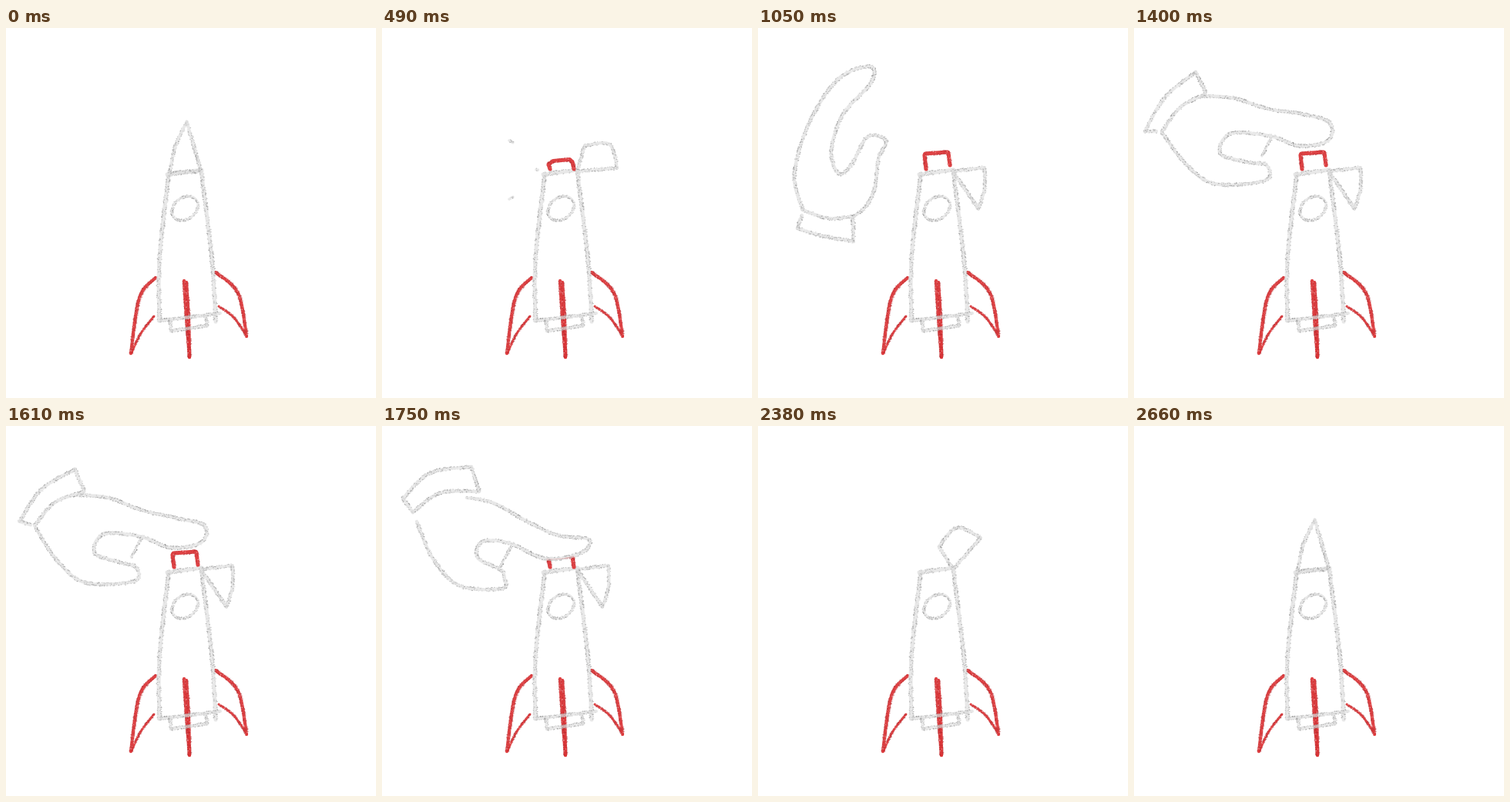
An HTML page with a canvas that plays this animation: 480 px wide and 480 px high, repeating every 2800 ms.

```html
<!DOCTYPE html>
<html lang="en">
<head>
<meta charset="utf-8">
<title>Rocket button</title>
<style>
html, body { margin: 0; height: 100%; overflow: hidden; background: #fff; }
canvas { display: block; width: 100vmin; height: 100vmin; }
</style>
</head>
<body>
<canvas id="stage" width="480" height="480"></canvas>
<script>
const ctx = document.getElementById('stage').getContext('2d');
const LOOP = 2800, STEP = 70;
const GRAY = { base: 'rgba(222,222,222,.7)', grain: [100, 100, 100], depth: 95 };
const RED = { base: 'rgba(220,52,54,.93)', grain: [150, 25, 30], depth: 50 };

const parse = text => text.split('|').map(s => s.trim().split(/\s+/).map(p => p.split(',').map(Number)));
const lerp = (a, b, k) => a + (b - a) * k;
const mix = (p, q, k) => [lerp(p[0], q[0], k), lerp(p[1], q[1], k)];

const ramp = (t, from, to) => Math.min(1, Math.max(0, (t - from) / (to - from)));
const ease = (t, from, to) => { const u = ramp(t, from, to); return u * u * (3 - 2 * u); };
const hump = (t, from, to) => Math.sin(Math.PI * ramp(t, from, to));

let seed;
function rnd() {
  seed = (Math.imul(seed, 1664525) + 1013904223) >>> 0;
  return seed / 4294967296;
}

// Catmull-Rom through the points
function smooth(pts) {
  const out = [pts[0]];
  for (let i = 0; i < pts.length - 1; i++) {
    const b = pts[i], c = pts[i + 1], a = pts[i - 1] || b, d = pts[i + 2] || c;
    for (let u = 0.125; u <= 1; u += 0.125)
      out.push([0, 1].map(j => b[j] + u / 2 * (c[j] - a[j] +
        u * (2 * a[j] - 5 * b[j] + 4 * c[j] - d[j] + u * (3 * (b[j] - c[j]) + d[j] - a[j])))));
  }
  return out;
}

function trace(pts) {
  ctx.beginPath();
  pts.forEach(p => ctx.lineTo(...p));
}

// A crayon line: pale core with patchy grain, densest near its edges
function ink(pts, width, tone) {
  trace(pts);
  ctx.strokeStyle = tone.base;
  ctx.lineWidth = width - 0.5;
  ctx.lineCap = ctx.lineJoin = 'round';
  ctx.stroke();
  let patch = 0.6;
  for (let i = 1; i < pts.length; i++) {
    const [x, y] = pts[i - 1], dx = pts[i][0] - x, dy = pts[i][1] - y;
    const len = Math.hypot(dx, dy);
    for (let n = 0; n < len * 2.6; n++) {
      if (rnd() < 0.06) patch = 0.3 + rnd() * 0.7;
      if (rnd() > patch) continue;
      const u = n / len / 2.6, off = (rnd() < 0.5 ? -1 : 1) * Math.sqrt(rnd()) * width * 0.54;
      const shade = rnd() * tone.depth;
      const rgb = rnd() < 0.2 ? [255, 255, 255] : tone.grain.map(c => c + shade);
      ctx.fillStyle = `rgba(${rgb},${0.3 + rnd() * 0.35})`;
      ctx.fillRect(x + dx * u - dy / len * off - 0.5, y + dy * u + dx / len * off - 0.5, 1 + rnd() * 0.6, 1);
    }
  }
}

const outerFins = parse('194,324 173,350 162,422 | 272,317 301,344 312,400 | 231,328 234,375 238,427 | 234,330 237,380 238,427');
const innerFins = parse('163,421 175,396 192,374 | 312,399 295,375 276,361');
const body = parse('211,189 199,300 199,380 | 253,184 267,300 272,381 | 209,190 254,184');
const nozzle = parse('198,380 278,370 | 213,379 214,393 | 214,393 261,386 | 261,386 259,374');
const porthole = Array.from({ length: 41 }, (_, i) => {
  const a = i * Math.PI / 20, x = 18.5 * Math.cos(a), y = 14 * Math.sin(a);
  return [232 + x * 0.8 + y * 0.6, 234 - x * 0.6 + y * 0.8];
});

function drawRocket() {
  const draw = (strokes, width, tone) => strokes.forEach(s => ink(smooth(s), width, tone));
  draw(outerFins, 4.8, RED);
  draw(innerFins, 3.4, RED);
  draw(body, 5.5, GRAY);
  draw(nozzle, 4.5, GRAY);
  ink(porthole, 3.6, GRAY);
}

// The button pops up with round shoulders that sharpen as it settles
function drawButton(up, press) {
  if (up < 0.1) return;
  const top = 184 - 23 * up + 8 * press, r = 12 * (1 - up);
  ink([[218, 183], [216, top + 4 + r / 2], [217 + r, top + 2], [246 - r / 2, top],
    [247, top + 1 + r / 2], [249, Math.min(183, top + 17)]], 5.6, RED);
}

// The nose cone swings about its hinge and bulges on the way
const HINGE = [253, 186];
function drawNose(k) {
  const swell = Math.sin(Math.PI * Math.min(1, k));
  const arm = (from, to, r) => {
    const a = lerp(from, to, k) * Math.PI / 180, d = r * (1 - 0.17 * swell);
    return [HINGE[0] + d * Math.cos(a), HINGE[1] + d * Math.sin(a)];
  };
  const base = arm(-184, -7, 41), tip = arm(-106, 56, lerp(67, 59, k));
  const side = mix(base, tip, 0.5), bulge = (4 + 17 * swell) / Math.hypot(tip[0] - base[0], tip[1] - base[1]);
  side[0] += (tip[1] - base[1]) * bulge;
  side[1] -= (tip[0] - base[0]) * bulge;
  ink([HINGE, base], 4.6, GRAY);
  ink(smooth([base, side, tip]), 4.6, GRAY);
  ink([tip, HINGE], 4.6, GRAY);
}

// Raised, pointing and pressing; strokes: outline, wrist, cuff, curled finger
const hands = [
  `58,236 47,190 66,124 104,66 146,50 146,72 110,112 95,160 105,189 122,176 142,141 166,146
   156,170 152,205 141,230 125,244 | 125,244 92,247 58,236 |
   123,247 124,277 85,270 51,260 57,243 | 122,176 142,141`,
  `88,88 130,91 174,105 220,112 254,123 252,146 215,153 176,140 125,137 112,163 148,174 172,178
   170,198 104,202 66,175 36,135 | 36,135 60,103 92,86 |
   29,134 14,134 40,90 80,57 93,84 | 178,142 166,166`,
  `110,93 145,100 185,122 228,142 268,147 258,165 212,172 165,152 130,150 124,171 153,186 159,198
   156,211 100,207 66,172 45,124 | 40,112 75,87 126,85 |
   40,112 27,94 62,61 116,53 126,85 | 168,155 153,183`
].map(parse);

function turn([x, y], a) {
  const dx = x - 110, dy = y - 150, c = Math.cos(a), s = Math.sin(a);
  return [110 + dx * c - dy * s, 150 + dx * s + dy * c];
}

function drawHand(k, size) {
  if (size <= 0) return;
  const i = k < 1 ? 0 : 1, swing = i ? 0 : 1.43;
  const [outline, wrist, cuff, finger] = hands[i].map((s, n) => s.map((p, m) =>
    turn(mix(p, turn(hands[i + 1][n][m], -swing), k - i), swing * (k - i))));
  const [px, py] = i ? [160, 188] : [110, 165];
  ctx.save();
  ctx.translate(px, py);
  ctx.scale(size, size);
  ctx.translate(-px, -py);
  const palm = smooth(outline), heel = smooth(wrist);
  trace([...palm, ...heel]);
  ctx.fillStyle = '#fff';
  ctx.fill();
  [palm, heel, cuff.slice(0, 2), smooth(cuff.slice(1, 4)), cuff.slice(3)].forEach(s => ink(s, 4.8, GRAY));
  if (k > 0.5) ink(finger, 3.6, GRAY);
  ctx.restore();
}

// Three dashes fly off to the left, shrinking towards their outer ends
function drawDashes(x, y, from) {
  for (const i of [-1, 0, 1]) {
    const end = [x - (i ? 70 : 35), y + i * 38];
    ink([mix([x, y], end, from), end], 4, GRAY);
  }
}

function draw(t) {
  const open = ease(t, 280, 640) + 0.1 * hump(t, 560, 840) - ease(t, 2170, 2520);
  const up = ease(t, 350, 600) - ease(t, 2170, 2380);
  const press = ease(t, 1540, 1750) - ease(t, 1820, 1960);
  const size = ease(t, 780, 930) + 0.1 * hump(t, 840, 1050) - ease(t, 1960, 2110);
  const shake = t > 1750 && t < 2380 ? (t / STEP % 2 ? 1 : -1) : 0;

  seed = 41;
  ctx.fillStyle = '#fff';
  ctx.fillRect(0, 0, 480, 480);
  ctx.save();
  ctx.translate(shake, 0);
  drawRocket();
  drawButton(up, press);
  drawNose(open);
  ctx.restore();
  if (t >= 350 && t <= 490) drawDashes(235, 184, 0.4 + 0.53 * ramp(t, 350, 490));
  if (t >= 2520 && t < 2660) drawDashes(215, 196, 0.5 + 0.4 * ramp(t, 2520, 2600));
  drawHand(ease(t, 1120, 1400) + press, size);
}

let shown = -1;
function tick() {
  const t = Math.floor(performance.now() % LOOP / STEP) * STEP;
  if (t !== shown) draw(shown = t);
  requestAnimationFrame(tick);
}
tick();
</script>
</body>
</html>
```
